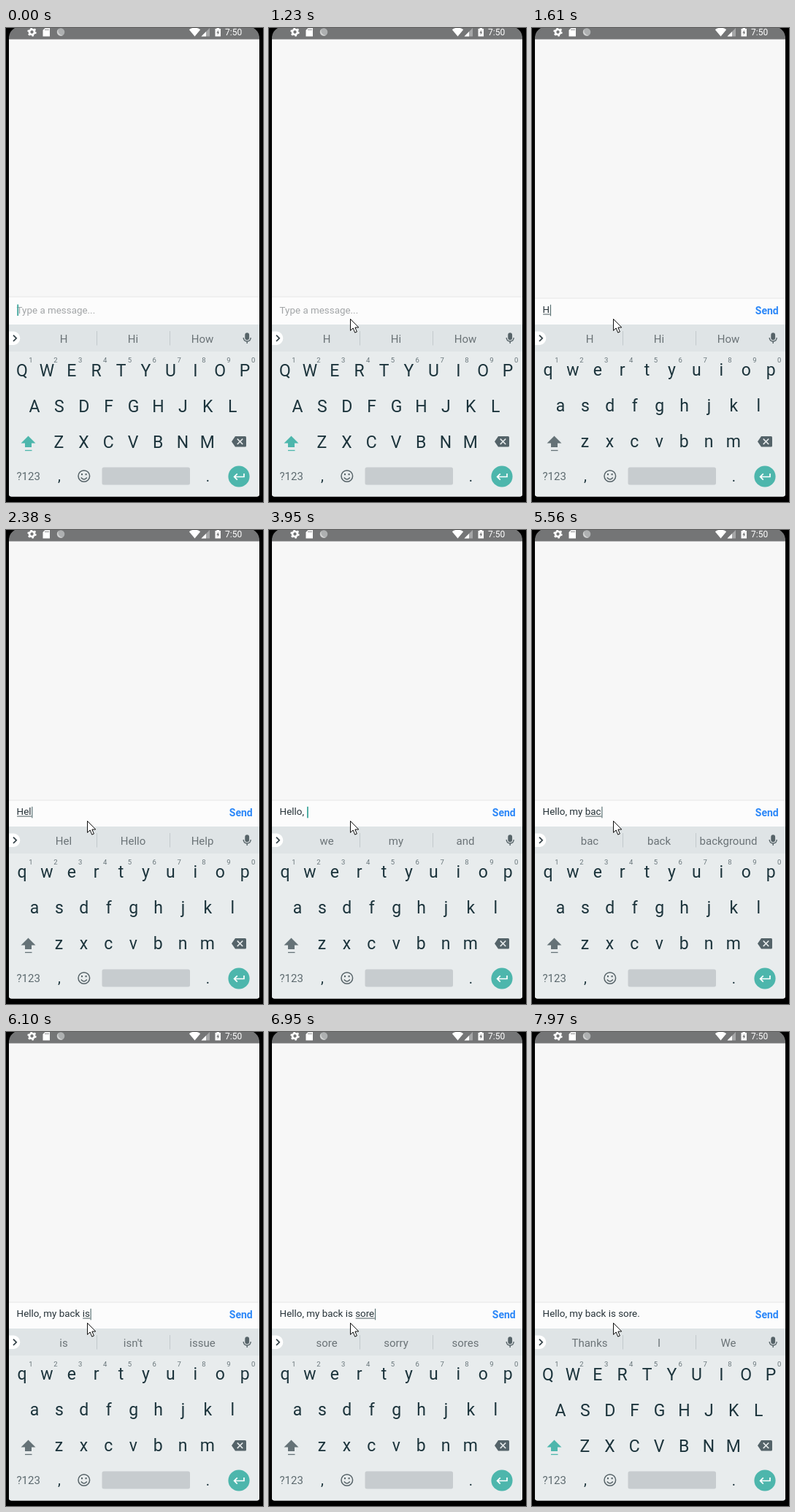
Animation of 352 by 649 pixels, one loop 8 s. Source, as an HTML page:

```html
<!DOCTYPE html>
<html lang="en">
<head>
<meta charset="utf-8">
<title>Typing a message</title>
<style>
html, body { margin: 0; width: 100%; height: 100%; overflow: hidden; background: #000; }
svg { display: block; width: 100%; height: 100%; font-family: Roboto, sans-serif; }
text { white-space: pre; }
.mid { text-anchor: middle; }
.key { font-size: 23px; fill: #1c343c; }
.hint { font-size: 9.5px; fill: #68757a; }
.word { font-size: 15px; fill: #6b7377; }
.field { font-size: 13.4px; }
</style>
</head>
<body>
<svg id="stage" viewBox="0 0 352 649">
  <rect width="352" height="649"/>
  <path d="M4 15H347V638Q347 641.500 343.500 641.500H7.500Q4 641.500 4 638Z" fill="#f7f7f7"/>
  <path d="M4 15.500V12Q5 4 12 0H339Q346 4 347 12V15.500Z" fill="#747576"/>

  <g fill="#fff">
    <circle cx="35.500" cy="5.500" r="3.500" fill="none" stroke="#fff" stroke-width="2.700"/>
    <circle cx="35.500" cy="5.500" r="5.300" fill="none" stroke="#fff" stroke-width="1.800" stroke-dasharray="2.500 3.050"/>
    <path d="M53.500 0H60V11.500H50.500V3Z"/>
    <path d="M54 1V3.500M56 1V3.500M58 1V3.500" stroke="#747576" stroke-width=".8"/>
    <circle cx="75" cy="5.500" r="5.300" fill="#aeb0b1"/>
    <path d="M72 1.200A5.300 5.300 0 0 0 78 9.900A6 6 0 0 1 72 1.200Z" fill="#d4d5d5"/>
    <path d="M250.800 2.200Q258.500 -3 266.200 2.200L258.500 11.500Z"/>
    <path d="M279 0V11.500H267.500Z" fill="#a5a6a7"/>
    <path d="M274 5V11.500H267.500Z"/>
    <path d="M288.500 0H292V1H294V11.500H286.500V1H288.500Z"/>
    <path d="M291 2.500L288.300 6.700H290L289.600 9.800L292.300 5.500H290.600Z" fill="#747576"/>
    <text x="300" y="10.300" font-size="12">7:50</text>
  </g>

  <rect id="input" x="4" width="343" fill="#fcfcfc"/>
  <rect id="rule" x="4" width="343" height="1" fill="#e8e8e8"/>
  <text id="hold" class="field" x="14.600" y="391.300" fill="#a2a5a7">Type a message...</text>
  <text id="msg" class="field" x="14.600" y="390" fill="#263238"></text>
  <rect id="under" y="391.500" height="1" fill="#4b5a5e"/>
  <rect id="caret" height="15.500"/>
  <text id="send" x="305.800" y="392.300" font-size="14" font-weight="700" fill="#2b87f8">Send</text>

  <rect x="4" y="406" width="343" height="37.500" fill="#dfe4e6"/>
  <path d="M4 443H347V638Q347 641.500 343.500 641.500H7.500Q4 641.500 4 638Z" fill="#e8eced"/>
  <path d="M4 415.500H11A9.300 9.300 0 0 1 11 434H4Z" fill="#fff"/>
  <path d="M10 420.700L14.200 424.800L10 428.900" fill="none" stroke="#344248" stroke-width="1.700"/>
  <path d="M124.500 415V434.500M224.500 415V434.500" stroke="#c2c9cc"/>
  <g fill="none" stroke="#566368" stroke-width="1.400">
    <rect x="328" y="418" width="4.400" height="8.500" rx="2.200" fill="#566368"/>
    <path d="M325.200 424Q325.500 429 330.200 429Q335 429 335.200 424M330.200 429V432"/>
  </g>
  <g id="words"></g>
  <g id="keys"></g>

  <g id="shift">
    <path d="M30.500 558.500L40.500 568.500H35V574H26V568.500H20.500Z"/>
    <rect x="26" y="577.800" width="9.500" height="1.300"/>
  </g>
  <path d="M314 559H327.500Q329 559 329 560.500V572Q329 573.500 327.500 573.500H314L309 566.200Z" fill="#546369"/>
  <path d="M316.800 562.500L324.200 570M324.200 562.500L316.800 570" stroke="#e8eced" stroke-width="1.700"/>
  <text x="14.500" y="619" font-size="15" fill="#5d6a6f">?123</text>
  <text class="key mid" x="73" y="620" style="font-size:20px">,</text>
  <g fill="none" stroke="#566368" stroke-width="1.500">
    <circle cx="106.800" cy="613.500" r="7.800"/>
    <path d="M102.800 615.500Q106.800 620.500 110.800 615.500"/>
    <path d="M104 610V612.300M109.600 610V612.300" stroke-width="2"/>
  </g>
  <rect x="131.500" y="601.500" width="120.500" height="24" rx="2.500" fill="#c7cccf"/>
  <text class="key mid" x="276.500" y="621" style="font-size:20px">.</text>
  <circle cx="319" cy="614" r="14.600" fill="#4db6ac"/>
  <path d="M326 610V614.500H312.800M316.800 610.300L312.600 614.500L316.800 618.700" fill="none" stroke="#fff" stroke-width="1.700"/>

  <path id="mouse" d="M0 0V15.800L3.700 12.400L6.200 18.600L8.900 17.500L6.400 11.500H11.300Z" fill="#fff" stroke="#111" stroke-linejoin="round"/>
</svg>
<script>
const LOOP = 8000, BLINK = 545, LEFT = 14.6;
const $ = id => document.getElementById(id);

// [time, typed so far, suggestions]
const typing = [
  [0, "", "H Hi How"],
  [1460, "H", "H Hi How"],
  [2000, "He", "He Hey Here"],
  [2380, "Hel", "Hel Hello Help"],
  [2530, "Hell", "Hell Hello He'll"],
  [2850, "Hello", "Hello Hello Hellos"],
  [3710, "Hello,", "we my and"],
  [3950, "Hello, ", "we my and"],
  [4720, "Hello, m", "m my me"],
  [4870, "Hello, my", "my myself mycket"],
  [5030, "Hello, my ", "Elbow back phone"],
  [5330, "Hello, my b", "b back but"],
  [5410, "Hello, my ba", "ba back bad"],
  [5560, "Hello, my bac", "bac back background"],
  [5640, "Hello, my back", "back backs backpack"],
  [5790, "Hello, my back ", "is and in"],
  [5950, "Hello, my back i", "i is it's"],
  [6100, "Hello, my back is", "is isn't issue"],
  [6330, "Hello, my back is ", "not going the"],
  [6640, "Hello, my back is s", "s so still"],
  [6720, "Hello, my back is so", "so so some"],
  [6870, "Hello, my back is sor", "sor sorry sort"],
  [6950, "Hello, my back is sore", "sore sorry sores"],
  [7250, "Hello, my back is sore.", "Thanks I We"],
  [7420, "Hello, my back is sore. ", "Thanks I We"]
];
const mousePath = [[70, 110, 395], [300, 112.5, 390], [460, 112.5, 385],
  [540, 112.5, 391], [690, 112.5, 388], [770, 111.5, 398.5]];

function addText(parent, cls, x, y, str) {
  const el = document.createElementNS("http://www.w3.org/2000/svg", "text");
  el.setAttribute("class", cls);
  el.textContent = str;
  set(el, { x, y });
  parent.appendChild(el);
  return el;
}
function set(el, attrs) {
  for (const k in attrs) el.setAttribute(k, attrs[k]);
}
function show(el, on) {
  el.style.display = on ? "" : "none";
}
const latest = (list, t) => list.filter(s => s[0] <= t).pop();

const keys = [];
[["QWERTYUIOP", 22, 477], ["ASDFGHJKL", 39, 526], ["ZXCVBNM", 72.5, 575]].forEach(([row, x, y]) =>
  [...row].forEach((ch, i) =>
    keys.push({ ch, y, el: addText($("keys"), "key mid", x + i * 33.9, y, ch) })));
[..."1234567890"].forEach((d, i) => addText($("keys"), "hint mid", 34 + i * 33.85, 458, d));
const words = [79, 174, 269].map(x => addText($("words"), "word mid", x, 430.7, ""));

const width = str => {
  $("msg").textContent = str;
  return str ? $("msg").getComputedTextLength() : 0;
};

function draw(t) {
  const [since, str, hints] = latest(typing, t);
  const empty = !str;
  const caps = t < 1610 || t >= 7330;
  const composing = (str.match(/[a-z]+$/i) || [""])[0];

  hints.split(" ").forEach((w, i) => words[i].textContent = w);
  for (const k of keys) {
    k.el.textContent = caps ? k.ch : k.ch.toLowerCase();
    k.el.setAttribute("y", caps ? k.y : k.y - 1.5);
  }
  $("shift").setAttribute("fill", caps ? "#4db6ac" : "#657277");

  const top = empty ? 368 : 370;
  set($("input"), { y: top, height: 406 - top });
  set($("rule"), { y: top - 0.5 });
  show($("hold"), empty);
  show($("send"), !empty);

  const start = width(str.slice(0, str.length - composing.length));
  const end = width(str);
  set($("under"), { x: LEFT + start + 0.5, width: Math.max(0, end - start) });
  show($("under"), composing);

  const lit = empty ? t < 300 || (t >= 690 && t < 1230)
                    : Math.floor((t - since) / BLINK) % 2 === 0;
  set($("caret"), {
    x: LEFT + end + 0.7,
    y: empty ? 378.5 : 378.8,
    width: composing ? 1.2 : 1.8,
    fill: composing ? "#5c7476" : "#3fa69c"
  });
  show($("caret"), lit);

  const at = latest(mousePath, t);
  show($("mouse"), at);
  if (at) $("mouse").setAttribute("transform", `translate(${at[1]} ${at[2]})`);
}

function frame() {
  draw(performance.now() % LOOP);
  requestAnimationFrame(frame);
}
frame();
</script>
</body>
</html>
```
